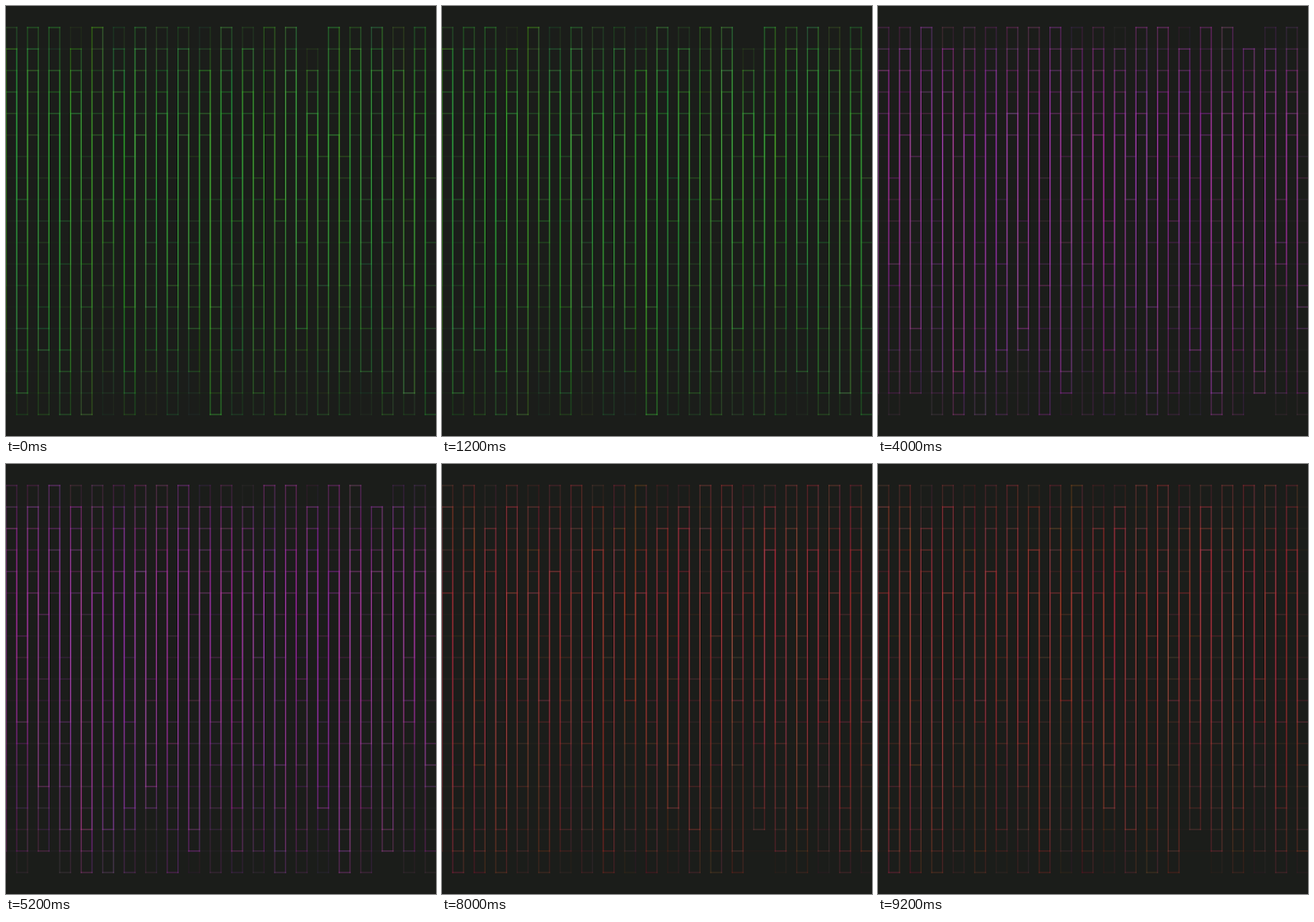
An HTML page with a canvas that plays this animation: 748x748 px, repeating every 10000 ms.

```html
<!DOCTYPE html>
<html>
<head>
<meta charset="utf-8">
<title>Square waves</title>
<style>
html, body { margin: 0; width: 100%; height: 100%; overflow: hidden; background: #1b1d1a; }
canvas { display: block; }
</style>
</head>
<body>
<canvas id="stage" width="748" height="748"></canvas>
<script>
const SIZE = 748, ROW = SIZE / 20, COL = SIZE / 40, WAVES = 24, HOLD = 2000;
// Which of red, green and blue are strong in each scene
const TINTS = [[0, 1, 0], [1, 1, 0], [1, 0, 1], [0, 1, 1], [1, 0, 0]];
const ctx = document.getElementById('stage').getContext('2d');

function seeded(seed) {
  return () => {
    seed = (seed + 0x6D2B79F5) | 0;
    let t = Math.imul(seed ^ (seed >>> 15), 1 | seed);
    t = (t + Math.imul(t ^ (t >>> 7), 61 | t)) ^ t;
    return ((t ^ (t >>> 14)) >>> 0) / 4294967296;
  };
}

function line(x1, y1, x2, y2) {
  ctx.beginPath();
  ctx.moveTo(x1, y1);
  ctx.lineTo(x2, y2);
  ctx.stroke();
}

function drawScene(index) {
  const random = seeded(97 + index * 131);
  const tint = TINTS[index];
  const shade = () => 'rgb(' + tint.map(on =>
    Math.round(on ? 105 + 90 * random() : 15 + 95 * random())) + ')';
  const level = col => ROW * (col % 2
    ? 7 + Math.floor(13 * random() ** 0.8)
    : 1 + Math.floor(6 * random()));

  ctx.globalAlpha = 1;
  ctx.fillStyle = '#1b1d1a';
  ctx.fillRect(0, 0, SIZE, SIZE);
  ctx.lineWidth = 2.5;
  ctx.lineCap = 'square';

  // Faint horizontals behind the waves
  ctx.globalAlpha = 0.045;
  for (let row = 2; row < 19; row++) {
    ctx.strokeStyle = shade();
    line(0, row * ROW, SIZE, row * ROW);
  }

  // Translucent waves stack up into the bright middle band
  ctx.globalAlpha = 0.08;
  for (let wave = 0; wave < WAVES; wave++) {
    let last = level(1);
    for (let col = 0; col < 40; col++) {
      const x = col * COL, y = level(col);
      ctx.strokeStyle = shade();
      line(x, last, x, y);
      line(x, y, x + COL, y);
      last = y;
    }
  }
}

let shown = -1;
function tick() {
  const index = Math.floor(performance.now() / HOLD) % TINTS.length;
  if (index !== shown) drawScene(shown = index);
  requestAnimationFrame(tick);
}
tick();
</script>
</body>
</html>
```
